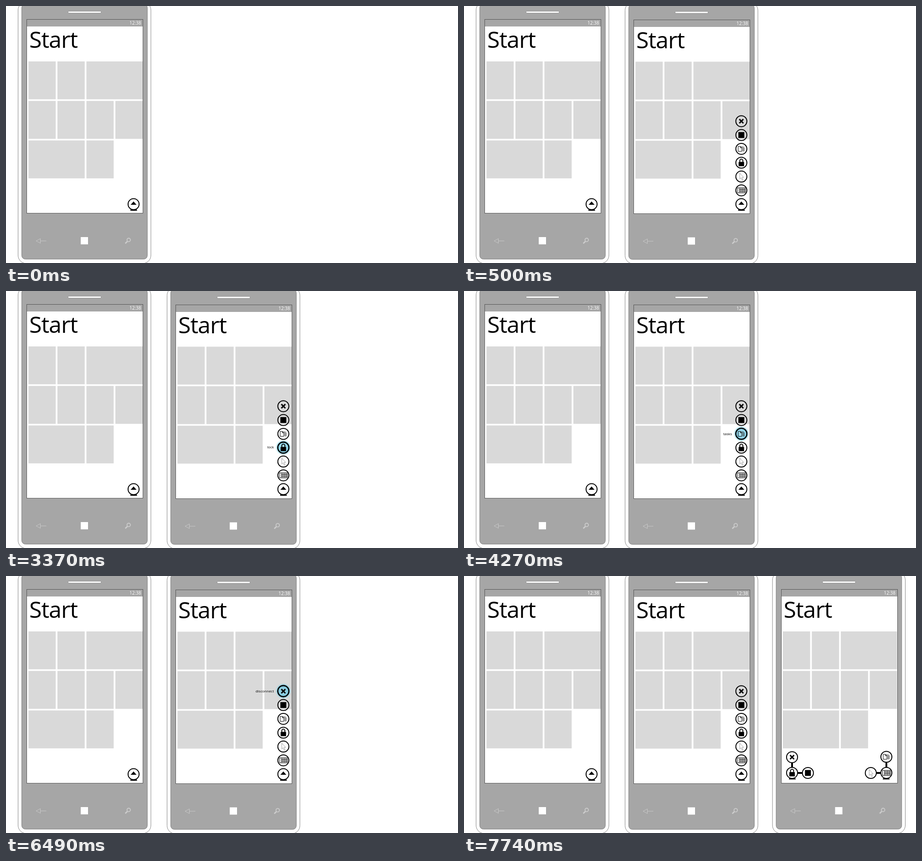
These frames come from a looping animation (992x565 px, 8000 ms). An HTML page:

```html
<!DOCTYPE html>
<html lang="en">
<head>
<meta charset="utf-8">
<title>Phone menu concept</title>
<style>
  html, body { margin: 0; width: 100%; height: 100%; overflow: hidden; background: #fff; }
  svg { display: block; width: 100%; height: 100%; }
  text { font-family: "Open Sans", "Noto Sans", sans-serif; }
  .title { font-size: 50px; letter-spacing: -.02em; }
  .clock { font-size: 10px; fill: #fff; text-anchor: end; }
  .label { font-size: 8px; text-anchor: end; }
  .line { fill: none; stroke: #000; }
  .crisp { shape-rendering: crispEdges; }
</style>
</head>
<body>
<svg viewBox="0 0 992 565">
  <defs>
    <radialGradient id="glow">
      <stop offset="0" stop-color="#7fd0e6" stop-opacity=".6"/>
      <stop offset=".72" stop-color="#5fc0de" stop-opacity=".8"/>
      <stop offset="1" stop-color="#7fd8f0" stop-opacity="0"/>
    </radialGradient>

    <g id="phone">
      <rect x="26.5" y="-9" width="291.5" height="575" rx="18" fill="#fff" stroke="#777" stroke-width=".9"/>
      <rect x="34.5" y="-4" width="275.7" height="560.5" rx="8" fill="#a6a6a6" stroke="#777" stroke-width=".9"/>
      <rect x="136.5" y="11.5" width="72" height="4" rx="1" fill="#fff" stroke="#808080" stroke-width=".8"/>
      <rect class="crisp" x="45.5" y="29.5" width="255" height="426" fill="#fff"/>
      <rect class="crisp" x="45.5" y="29.5" width="255" height="15.5" fill="#a6a6a6"/>
      <text class="clock" x="296.5" y="41.3">12:38</text>
      <text class="title" x="51" y="92">Start</text>
      <g id="tiles" fill="#d9d9d9"></g>
      <rect class="crisp" x="45.5" y="29.5" width="255" height="426" fill="none" stroke="#555"/>
      <path d="M75.5 511.5 66 516.5 75.5 521.5ZM75.5 516.5H88.5" fill="none" stroke="#ccc" stroke-width=".9"/>
      <rect x="164" y="508" width="16" height="16" fill="#fff"/>
      <g fill="none" stroke="#ccc">
        <circle cx="269.3" cy="514.3" r="3.8" stroke-width="1.8"/>
        <path d="M266.3 517.5 261.8 522" stroke-width="2.8"/>
      </g>
    </g>

    <circle id="ring" class="line" r="12.1" stroke-width="2"/>
    <path id="foot" class="line" d="M-7 13.2H7.5" stroke-width="2.5"/>
    <path id="disconnect" class="line" d="M-4.4-4.4 4.4 4.4M4.4-4.4-4.4 4.4" stroke-width="3"/>
    <rect id="start" x="-6.5" y="-6.5" width="13" height="13"/>
    <path id="tasks" class="line" d="M-7-5.5H-2.2L1-2.3V5.5H-7ZM-2.2-5.5V-2.3H1M-.5-5.5 3.5-2V5.5M2.5-5.5 6-2.5V5.5"/>
    <g id="lock">
      <rect x="-6" y="-1.8" width="12" height="9.5" rx="1"/>
      <path class="line" d="M-3.4-1V-4.5A3.4 3.4 0 0 1 3.4-4.5V-1" stroke-width="1.9"/>
    </g>
    <path id="pointer" class="line" d="M-3.5-7.5V5.5L-.6 2.8 1.8 8.2 3.9 7.2 1.5 2H5.3Z" style="stroke:#888;stroke-width:.8"/>
    <path id="keyboard" class="line" d="M-8.5-5.5H9V5.5H-8.5ZM-4.5-5.5V5.5M-1-5.5V5.5M2.5-5.5V5.5M6-5.5V5.5M-4.5-1.8H9M-4.5 1.8H9"/>
    <path id="up" d="M-6.5 1.2 0-6 6.5 1.2Z"/>
  </defs>

  <g id="first"></g>
  <g id="second"></g>
  <g id="third"></g>
</svg>
<script>
const $ = id => document.getElementById(id);
const LOOP = 8000;
const MENU_X = 608.7, MENU_TOP = 253.3, MENU_STEP = 30.4;
const MENU = ['disconnect', 'start', 'tasks', 'lock', 'pointer', 'keyboard', 'up'];
const SECOND_AT = 500, THIRD_AT = 7740;
const HIGHLIGHTS = [
  { at: 1720, name: 'keyboard', dy: 3 },
  { at: 2560, name: 'pointer', dy: 3 },
  { at: 3370, name: 'lock', dy: 1.2 },
  { at: 4270, name: 'tasks', dy: 3 },
  { at: 5170, name: 'start', dy: 3.6 },
  { at: 6490, name: 'disconnect', dy: 3 }
];

const use = (id, x, y) => `<use href="#${id}" x="${x}" y="${y}"/>`;
const button = (id, x, y) => use('ring', x, y) + use(id, x, y);
const menuY = name => MENU_TOP + MENU_STEP * MENU.indexOf(name);

// Column, row and column span of each tile.
const TILES = [[0, 0, 1], [1, 0, 1], [2, 0, 2], [0, 1, 1], [1, 1, 1], [2, 1, 1], [3, 1, 1], [0, 2, 2], [2, 2, 1]];
$('tiles').innerHTML = TILES.map(([col, row, span]) =>
  `<rect x="${49.3 + col * 63.6}" y="${121.8 + row * 86.9}" width="${span * 63.6 - 3.8}" height="83.3"/>`).join('');

$('first').innerHTML = use('phone', 0, 0) + button('up', 280, 435.7) + use('foot', 280, 435.7);

const highlights = HIGHLIGHTS.map(({ name, dy }) => {
  const y = menuY(name);
  return `<g id="hot-${name}">
    <circle cx="${MENU_X}" cy="${y - .3}" r="17.3" fill="url(#glow)"/>
    <circle class="line" cx="${MENU_X}" cy="${y - .3}" r="12.2" stroke-width="2.4"/>
    <text class="label" x="588" y="${y + dy}">${name}</text></g>`;
}).join('');
$('second').innerHTML = use('phone', 327, .6) + highlights +
  MENU.map(name => button(name, MENU_X, menuY(name))).join('') + use('foot', MENU_X, menuY('up'));

$('third').innerHTML = use('phone', 650.5, 0) +
  '<path class="line" d="M720 410V421M732 433H743M904 433H915M927 409V421" stroke-width="4"/>' +
  button('disconnect', 720, 398.3) + button('lock', 720, 432.8) + button('start', 754.8, 433) +
  button('pointer', 892.8, 433) + button('keyboard', 927, 432.8) + button('tasks', 927, 397.5) +
  use('foot', 720.3, 432.8) + use('foot', 926.3, 432.8);

const show = (id, visible) => $(id).setAttribute('visibility', visible ? 'visible' : 'hidden');

function draw(now) {
  const t = now % LOOP;
  $('second').style.display = t >= SECOND_AT ? '' : 'none';
  show('third', t >= THIRD_AT);
  HIGHLIGHTS.forEach(({ at, name }, i) => {
    const end = i + 1 < HIGHLIGHTS.length ? HIGHLIGHTS[i + 1].at : THIRD_AT;
    show('hot-' + name, t >= at && t < end);
  });
}

const began = performance.now();
function tick() {
  draw(performance.now() - began);
  requestAnimationFrame(tick);
}
tick();
</script>
</body>
</html>
```
